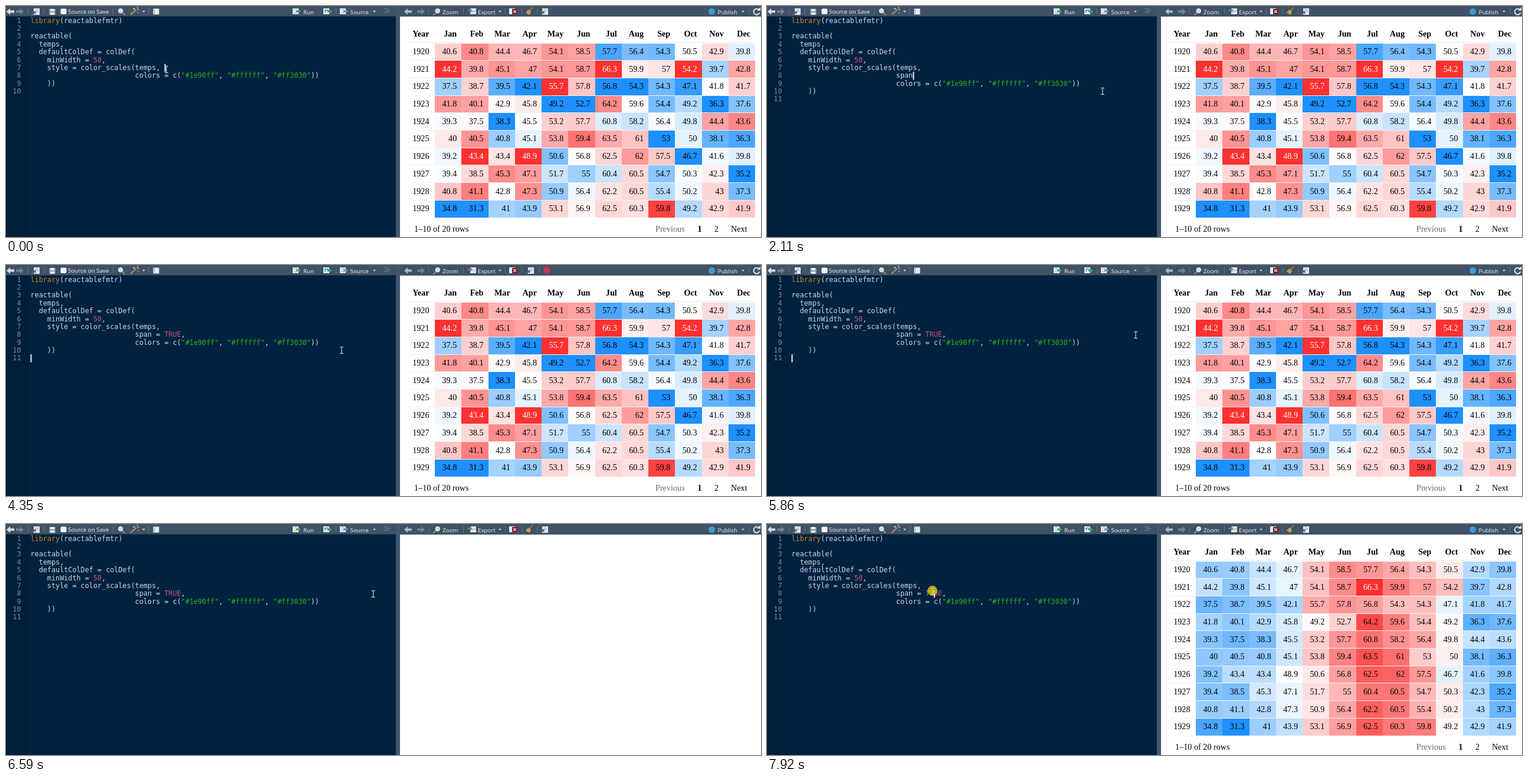
These frames come from a looping animation (1280 by 393 pixels, 8 s). An HTML page:

```html
<!DOCTYPE html>
<html lang="en">
<head>
<meta charset="utf-8">
<title>Colour scales</title>
<style>
html, body { margin: 0; width: 100%; height: 100%; overflow: hidden; background: #002240; }
svg { display: block; width: 1280px; height: 393px; }
text { white-space: pre; }
.code { font: 11.79px "DejaVu Sans Mono", monospace; fill: #ced8e1; }
.num { fill: #74879a; text-anchor: end; }
.kw { fill: #d08414; }
.const { fill: #cf5478; }
.str { fill: #2fb010; }
.ui { font: 9.8px "Open Sans", sans-serif; fill: #f2f5f7; }
.table { font: 14.2px "Liberation Serif", serif; fill: #000; }
.table rect { shape-rendering: crispEdges; }
.table .r { text-anchor: end; }
.b { font-weight: bold; }
</style>
</head>
<body>
<svg viewBox="0 0 1280 393" xmlns="http://www.w3.org/2000/svg">
  <defs>
    <path id="arrow" d="M0 5.5 6 0v3.4h7v4.2H6V11z"/>
    <path id="down" d="M0 0h5L2.5 3z" fill="#c9d2da"/>
    <g id="page"><path d="M3 0h10v11H3z" fill="#e3e8ec"/><path d="M5 3h6M5 5.5h6" stroke="#9aa7b2"/><path d="M0 11 5 6M2 6h3.5v3.5" stroke="#52687b" stroke-width="2" fill="none"/></g>
    <g id="glass"><path d="m6.5 6.5 5 5" stroke="#b98a55" stroke-width="2.2"/><circle cx="4.2" cy="4.2" r="3.6" fill="#c5dcec" stroke="#e6edf2" stroke-width="1.2"/></g>
    <path id="sheet" d="M0 0h10v10H0z" fill="#e6ebef"/>
    <g id="script"><use href="#sheet"/><path d="M2 2h6M2 7.5h6" stroke="#98a8b4"/></g>
    <path id="go" d="M0 2h4V0l4 3.5L4 7V5H0z"/>
    <g id="broom"><path d="M12 0 7 6" stroke="#b06a35" stroke-width="2"/><path d="M5 4 9 8 6 13 0 9z" fill="#e0b050"/><path d="m2 9 4-3M4 11l3-4" stroke="#a87522"/></g>
  </defs>

  <rect width="1280" height="393" fill="#002240"/>
  <rect y="18" width="38" height="375" fill="#011e3a"/>
  <rect width="661" height="17.5" fill="#3f5266"/>
  <rect x="661" width="7" height="393" fill="#40576d"/>
  <rect x="668" width="612" height="393" fill="#fff"/>
  <rect x="668" width="612" height="18" fill="#3f5266"/>

  <g id="seps" stroke="#62778a"></g>
  <use href="#arrow" x="1" y="4" fill="#d9e0e5"/>
  <use href="#arrow" transform="translate(30 4) scale(-1 1)" fill="#6f8293"/>
  <use href="#page" x="44" y="4"/>
  <path d="M73 5h11v10H73z" fill="#8193a3"/><path d="M75 5h7v4h-7zM75 11h7v4h-7z" fill="#edf1f4"/>
  <rect x="92.5" y="4.5" width="10" height="9.5" rx="2" fill="#f3f5f7"/>
  <use href="#glass" x="190" y="4"/>
  <path d="M211 15 221 6" stroke="#c98b4d" stroke-width="2"/><path d="M217 3v3M223 1v4M226 6h-3M224 10v2M215 5h4" stroke="#e7d9b8"/>
  <use href="#down" x="231" y="8"/>
  <use href="#sheet" x="249.5" y="4.5"/><path d="M251.5 4.5v10" stroke="#93a3b0"/>
  <use href="#script" x="486" y="4"/><use href="#go" x="492" y="5.5" fill="#2fa866"/>
  <use href="#sheet" x="538" y="4"/><path d="M541 11V7h6" stroke="#3b82b0" stroke-width="1.5" fill="none"/><use href="#go" x="545" y="6" fill="#2fa866"/>
  <use href="#script" x="566" y="4"/><use href="#go" x="572" y="5.5" fill="#5d8db8"/>
  <use href="#down" x="622" y="8"/>
  <path d="M640 5h9M643 8h8M640 11h9" stroke="#70869a" stroke-width="1.2"/>

  <use href="#arrow" x="675" y="4" fill="#a9b7c2"/>
  <use href="#arrow" transform="translate(710 4) scale(-1 1)" fill="#6f8293"/>
  <use href="#glass" transform="translate(736 4) scale(-1 1)"/>
  <use href="#sheet" x="787" y="4"/><path d="m789 12 3-4 2 2 3-3" stroke="#d38c3a" fill="none"/><use href="#go" x="783" y="4" fill="#4f8cc0"/>
  <use href="#down" x="835" y="8"/>
  <use href="#sheet" x="853" y="4"/><path d="M858 5h9v9h-9z" fill="#7c1518"/><path d="m860 7 5 5m0-5-5 5" stroke="#f0e4e4" stroke-width="1.4"/>
  <g id="idle"><use href="#broom" x="881" y="2"/><path d="M900.5 4v10" stroke="#62778a"/><use href="#page" x="906" y="4"/></g>
  <g id="busy"><use href="#page" x="882" y="4"/><path d="M904.5 4v10" stroke="#62778a"/><circle cx="917" cy="8.5" r="5.8" fill="#c9364c"/></g>
  <circle cx="1196.5" cy="9.5" r="5.5" fill="#3f9bd6"/>
  <use href="#down" x="1247" y="8"/>
  <path d="M1276 6a5 5 0 1 0 1.5 5" fill="none" stroke="#dce3e8" stroke-width="2"/><path d="M1273 8h6V2z" fill="#dce3e8"/>
  <g class="ui">
    <text x="105" y="13">Source on Save</text><text x="504" y="13.5">Run</text><text x="583.5" y="13.5">Source</text>
    <text x="740" y="13.5">Zoom</text><text x="800" y="13.5">Export</text><text x="1206.5" y="13.5">Publish</text>
  </g>

  <g id="byColumn" class="table"></g>
  <g id="bySpan" class="table"></g>
  <g id="code" class="code"></g>
  <rect id="caret" width="2" height="13.5" fill="#eef3f8"/>
  <circle id="click" r="8.5" fill="#d8c400" opacity=".8"/>
  <path id="mouse" d="M-3-5.500h2.200l.8.700.8-.7H3M-3 5.500h2.200l.8-.7.8.7H3M0-5V5" fill="none" stroke="#dde3e8" stroke-width="1.1"/>
</svg>
<script type="text/plain" id="temps">
Year Jan Feb Mar Apr May Jun Jul Aug Sep Oct Nov Dec
1920 40.6 40.8 44.4 46.7 54.1 58.5 57.7 56.4 54.3 50.5 42.9 39.8
1921 44.2 39.8 45.1 47 54.1 58.7 66.3 59.9 57 54.2 39.7 42.8
1922 37.5 38.7 39.5 42.1 55.7 57.8 56.8 54.3 54.3 47.1 41.8 41.7
1923 41.8 40.1 42.9 45.8 49.2 52.7 64.2 59.6 54.4 49.2 36.3 37.6
1924 39.3 37.5 38.3 45.5 53.2 57.7 60.8 58.2 56.4 49.8 44.4 43.6
1925 40 40.5 40.8 45.1 53.8 59.4 63.5 61 53 50 38.1 36.3
1926 39.2 43.4 43.4 48.9 50.6 56.8 62.5 62 57.5 46.7 41.6 39.8
1927 39.4 38.5 45.3 47.1 51.7 55 60.4 60.5 54.7 50.3 42.3 35.2
1928 40.8 41.1 42.8 47.3 50.9 56.4 62.2 60.5 55.4 50.2 43 37.3
1929 34.8 31.3 41 43.9 53.1 56.9 62.5 60.3 59.8 49.2 42.9 41.9
</script>
<script>
const $ = id => document.getElementById(id);
const LOOP = 8000, CHAR = 7.1, LEFT = 41.5, LINE = 13.37;

$('seps').innerHTML = [37, 64, 181, 241, 559, 716, 775, 846, 874, 1259]
  .map(x => `<path d="M${x}.5 4v10"/>`).join('');

// Table
const [head, ...rows] = $('temps').textContent.trim().split('\n').map(s => s.split(' '));
const range = values => [Math.min(...values), Math.max(...values)];
// Column maxima that lie on the second page
const hiddenMax = { Mar: 47.3, Jun: 60.7, Aug: 64.7, Sep: 60.1, Nov: 47.5, Dec: 45.8 };
const columnRange = head.map((name, c) => {
  const [lo, hi] = range(rows.map(row => +row[c]));
  return [lo, hiddenMax[name] || hi];
});
const fullRange = range(rows.flatMap(row => row.slice(1).map(Number)));

function shade(t) {
  const end = t < .5 ? [30, 144, 255] : [255, 48, 48], k = Math.abs(2 * t - 1);
  return `rgb(${end.map(v => Math.round(255 + (v - 255) * k))})`;
}

function drawTable(id, rangeOf) {
  const W = 45.25, H = 29.7, X = 681.75, Y = 62.5;
  const put = (x, y, s, attr = '') => `<text x="${x}" y="${y}" ${attr}>${s}</text>`;
  const box = (x, y, w, h, fill) => `<rect x="${x}" y="${y}" width="${w}" height="${h}" fill="${fill}"/>`;
  const right = c => X + W * (c + 1) - (c ? 8 : 9.5);
  let out = box(X, 61, W * 13, 2, '#f2f2f2');
  head.forEach((name, c) => out += put(right(c), 51.5, name, 'class="r b"'));
  rows.forEach((row, r) => {
    const y = Math.round(Y + H * r), next = Math.round(Y + H * (r + 1)), base = Y + H * r + 19.4;
    if (r) out += box(X, y, W * 13, 1, '#f2f2f2');
    row.forEach((v, c) => {
      const [lo, hi] = rangeOf(c), t = (v - lo) / (hi - lo);
      if (c) out += box(X + W * c, y + 1, W, next - y - 1, shade(t));
      out += put(right(c), base, v, `class="r"${c && t > .98 ? ' fill="#fff"' : ''}`);
    });
  });
  out += put(692, 384, '1–10 of 20 rows') + put(1101, 384, 'Previous', 'fill="#666"')
    + put(1172.5, 384, '1', 'class="b"') + put(1201, 384, '2') + put(1229, 384, 'Next');
  $(id).innerHTML = out;
}
drawTable('byColumn', c => columnRange[c]);
drawTable('bySpan', () => fullRange);

// Editor
const indent = ' '.repeat(25);
const source = ['library(reactablefmtr)', '', 'reactable(', '  temps,',
  '  defaultColDef = colDef(', '    minWidth = 50,', '    style = color_scales(temps,',
  indent + 'colors = c("#1e90ff", "#ffffff", "#ff3030"))', '    ))', ''];
const paint = s => s.replace(/"[^"]*"|\blibrary\b|\b(?:50|TRUE|T)\b/g, w =>
  `<tspan class="${w[0] === '"' ? 'str' : w === 'library' ? 'kw' : 'const'}">${w}</tspan>`);

let shown;
function drawCode(typed) {
  if (typed === shown) return;
  shown = typed;
  const lines = source.slice();
  if (typed !== null) lines.splice(7, 0, indent + typed);
  $('code').innerHTML = lines.map((s, i) => {
    const y = 28.7 + LINE * i;
    return `<text class="num" x="25.5" y="${y}">${i + 1}</text><text x="${LEFT}" y="${y}">${paint(s)}</text>`;
  }).join('');
}

// Timeline
const ENTER = 1050, RUN = 4080, BUSY = 4350, READY = 5860, CLEAR = 5960, REDRAW = 6670, CLICK = 7920;

// Bursts of typing: start, ms per key, text
const bursts = [[1680, 143, 'span'], [2300, 0, ' '], [2640, 100, '= '], [3180, 120, 'TRUE'], [3900, 0, ',']];
const typedAt = t => t < ENTER ? null : bursts.map(([start, gap, s]) =>
  [...s].filter((_, i) => t >= start + i * gap).join('')).join('');

// The caret stays lit while typing, then blinks from the last focus change
function caretOn(t) {
  if (t >= ENTER && t < BUSY) return true;
  const focus = [CLICK, 5790, BUSY, 330].find(f => t >= f) || 0;
  return (t - focus) % 990 < 530;
}

// Pointer moves in short holds: start, end, where to
const moves = [[340, 690, 569, 145], [5600, 5670, 625, 119], [6590, 6850, 557, 118], [7040, 7750, 281, 115]];
const ease = k => k ** 3 / (k ** 3 + (1 - k) ** 3);

function pointer(t) {
  let x = 272, y = 108;
  for (const [start, end, toX, toY] of moves) {
    if (t < start) break;
    const gaps = Math.round((end - start) / 88);
    const step = Math.floor((t - start) / (end - start) * gaps + .02) + 1;
    const e = ease(Math.min(1, step / (gaps + 1)));
    x += (toX - x) * e;
    y += (toY - y) * e;
  }
  return [x, y];
}

const show = (id, on) => $(id).style.display = on ? '' : 'none';
const place = (id, x, y) => $(id).setAttribute('transform', `translate(${x} ${y})`);

function draw(t) {
  const typed = typedAt(t), clicked = t >= CLICK;
  drawCode(typed);

  const [line, col] = clicked ? [7, 34] : t >= RUN ? [10, 0]
    : typed !== null ? [7, 25 + typed.length] : [6, 32];
  place('caret', LEFT + CHAR * col, 18.3 + LINE * line);
  show('caret', caretOn(t));

  place('mouse', ...pointer(t));
  place('click', clicked ? 280.5 : 271.5, clicked ? 113.5 : 107.5);
  show('click', clicked || t >= 90 && t < 190);

  const busy = t >= BUSY && t < READY;
  show('busy', busy);
  show('idle', !busy);
  show('byColumn', t < CLEAR);
  show('bySpan', t >= REDRAW);
}

const begin = performance.now();
function tick() {
  draw((performance.now() - begin) % LOOP);
  requestAnimationFrame(tick);
}
tick();
</script>
</body>
</html>
```
